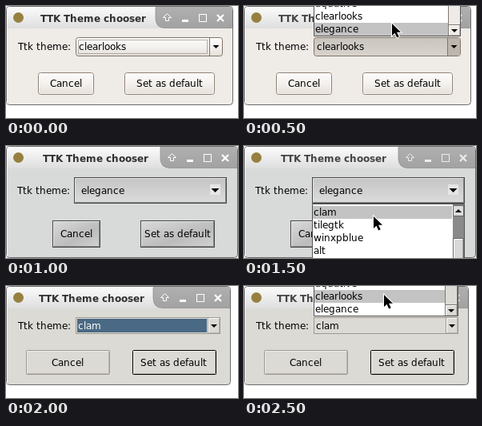
Animation, 290 px wide and 140 px high, one loop 3 s. Source, as an HTML page:

```html
<!DOCTYPE html>
<html lang="en">
<head>
<meta charset="utf-8">
<title>Theme chooser</title>
<style>
html, body { margin: 0; width: 100%; height: 100%; overflow: hidden; background: #fff; }
svg { display: block; width: 290px; height: 140px; }
text { font: 12px "DejaVu Sans", sans-serif; font-kerning: none; white-space: pre; }
.bold { font-weight: bold; }
.scene { visibility: hidden; animation: show 3s step-end infinite; }
@keyframes show {
  0% { visibility: visible; }
  16.6667%, 100% { visibility: hidden; }
}
</style>
</head>
<body>
<svg id="stage" viewBox="0 0 290 140">
  <defs>
    <linearGradient id="bar" x2="0" y2="1"><stop stop-color="#fbfbfb"/><stop offset="1" stop-color="#dedede"/></linearGradient>
    <linearGradient id="wave" x2="0" y2="1"><stop stop-color="#b0b0b0"/><stop offset="1" stop-color="#a2a2a2"/></linearGradient>
    <linearGradient id="cream" x2="0" y2="1"><stop stop-color="#fdfcfb"/><stop offset=".5" stop-color="#f4f1ee"/><stop offset="1" stop-color="#e5dfd9"/></linearGradient>
    <linearGradient id="pressed" x2="0" y2="1"><stop stop-color="#c9c4be"/><stop offset="1" stop-color="#d8d3cd"/></linearGradient>
    <linearGradient id="steel" x2="0" y2="1"><stop stop-color="#c4c4c4"/><stop offset="1" stop-color="#dcdcdc"/></linearGradient>
    <linearGradient id="brushed" y2="1"><stop stop-color="#dadada"/><stop offset=".6" stop-color="#bcbcbc"/><stop offset="1" stop-color="#d2d2d2"/></linearGradient>
  </defs>
</svg>
<script>
const pen = document.createElement('canvas').getContext('2d');

// Glyphs advance by whole pixels, as in the toolkit's text
function advances(x, s, bold) {
  pen.font = `${bold ? 'bold ' : ''}12px "DejaVu Sans", sans-serif`;
  return [...s].map(c => {
    const at = x;
    x += Math.round(pen.measureText(c).width);
    return at;
  }).join(' ');
}

const rect = (x, y, w, h, fill, r = 0) =>
  `<rect x="${x}" y="${y}" width="${w}" height="${h}" rx="${r}" fill="${fill}"/>`;
const frame = (x, y, w, h, line, fill = 'none', r = 0, extra = '') =>
  `<rect x="${x + .5}" y="${y + .5}" width="${w - 1}" height="${h - 1}" rx="${r}" fill="${fill}" stroke="${line}" ${extra}/>`;
const path = (d, fill, line = 'none', width = 1) =>
  `<path d="${d}" fill="${fill}" stroke="${line}" stroke-width="${width}" paint-order="stroke"/>`;
const text = (x, y, s, fill = '#000', cls = '') =>
  `<text x="${advances(x, s, cls === 'bold')}" y="${y}" fill="${fill}" class="${cls}">${s}</text>`;
const down = (x, y, r = 4) => path(`M${x - r} ${y}h${2 * r}l${-r} ${r}z`, '#000');
const up = (x, y, r = 4) => path(`M${x - r} ${y}h${2 * r}l${-r} ${-r}z`, '#000');
const cursor = (x, y) =>
  path(`M${x} ${y}v15l3.5-3.3 2.7 5.8 2.5-1.2-2.7-5.5h5z`, '#000', '#fff', 2);

// Raised or sunken edge inside a box
const bevel = (x, y, w, h, light, dark) =>
  path(`M${x + .5} ${y + h - .5}V${y + .5}H${x + w - .5}`, 'none', light) +
  path(`M${x + .5} ${y + h - .5}H${x + w - .5}V${y + .5}`, 'none', dark);

function titleIcons(w, color) {
  const [a, b, c, d] = [82.5, 60, 38, 16].map(n => w - n);
  return path(`M${a} 9.5l-5 5h3v4h4v-4h3z`, 'none', color) +
    rect(b - 4, 17, 8, 3, color) +
    frame(c - 5, 10, 10, 10, color) +
    path(`M${d - 4} 11l8 8m0-8l-8 8`, 'none', color, 2.2);
}

function shell(w, h, bg, active) {
  const x = w - 97, edge = `M${x} 1V15Q${x} 27.5 ${x + 12} 27.5H${w - 1}`;
  return rect(0, 0, 290, 140, '#fff') +
    frame(0, 0, w, h, '#6c6c6c', bg, 4) +
    path(`M1 28V5Q1 1 5 1H${w - 5}Q${w - 1} 1 ${w - 1} 5V28z`, 'url(#bar)') +
    path(`${edge}V5Q${w - 1} 1 ${w - 5} 1z`, 'url(#wave)') +
    path(edge, 'none', '#929292', .8) +
    path(`M1.5 ${h - 2}V5Q2 1.5 5 1.5H${x}`, 'none', '#fff', .8) +
    '<circle cx="15.5" cy="14.5" r="6.5" fill="#96803f"/>' +
    text(Math.floor(w / 2) - 99, 20, 'TTK Theme chooser', active ? '#303030' : '#444', 'bold') +
    titleIcons(w, active ? '#fff' : '#ececec');
}

// Drop-down list hanging in from the top edge
function upperList(w, barX, pick, bg) {
  return rect(87, 0, w, 38, '#fff') +
    rect(88, pick, barX - 88, 16, '#c3c3c3') +
    text(89, 1, 'aquative') + text(89, 17, 'clearlooks') + text(89, 33, 'elegance') +
    frame(barX, -4, 16, 28, '#7e7972', bg) +
    frame(barX, 23, 16, 15, '#7e7972', bg) +
    bevel(barX + 1, 24, 14, 13, '#fff', '#bbb6ae') +
    down(barX + 8, 29) +
    path(`M87.5 0V37.5H${86.5 + w}V0`, 'none', '#555');
}

function creamButton(x, w, label, textX) {
  return frame(x, 83, w, 28, '#8f8276', 'url(#cream)', 3) +
    frame(x + 1, 84, w - 2, 26, '#fff', 'none', 2, 'stroke-opacity=".65"') +
    text(textX, 101, label);
}

function clearlooks(open) {
  const fill = open ? 'url(#pressed)' : 'url(#cream)';
  return shell(284, 124, '#efebe7', !open) +
    text(15, 55, 'Ttk theme:') +
    frame(87, 39, 184, 24, '#80756a', fill, 3) +
    (open ? rect(255, 40, 15, 22, '#bcb6af') : frame(90, 42, 162, 18, '#6b6660', 'none', 0, 'stroke-dasharray="1 1"')) +
    path('M254.5 40V62', 'none', '#80756a') +
    text(91, 55, 'clearlooks') + down(262.5, 49) +
    creamButton(40, 70, 'Cancel', 55) +
    creamButton(148, 113, 'Set as default', 163) +
    (open ? upperList(184, 255, 21, '#efebe7') + cursor(185, 22) : '');
}

function steelBox(x, y, w, h, fill) {
  return frame(x, y, w, h, '#484848', `url(#${fill})`) +
    bevel(x + 1, y + 1, w - 2, h - 2, '#e6e6e6', '#848484');
}

function elegance(open) {
  let s = shell(290, 140, '#d8dada', !open) +
    text(14, 60, 'Ttk theme:') +
    steelBox(85, 39, 191, 33, 'steel') + text(94, 60, 'elegance') +
    rect(255, 48, 13, 13, '#e6e6e6') + down(261.5, 53, 5) +
    steelBox(58, 93, 60, 34, 'brushed') + text(68, 114, 'Cancel') +
    steelBox(168, 93, 93, 34, 'brushed') + text(173, 114, 'Set as default');
  if (!open) return s;
  s += rect(85, 72, 191, 68, '#fff') + rect(86, 75, 174, 16, '#c3c3c3');
  ['clam', 'tilegtk', 'winxpblue', 'alt'].forEach((name, i) => s += text(87, 87 + 16 * i, name));
  return s + rect(261, 73, 14, 67, '#8a8a8a') +
    frame(261, 74, 14, 14, '#666', '#dcdcdc') + up(268, 83) +
    frame(261, 115, 14, 30, '#666', '#d8d8d8') + bevel(262, 116, 12, 28, '#fff', '#a5a5a5') +
    path('M85.5 140V72.5H275.5V140', 'none', '#555') + cursor(162, 88);
}

function clamButton(x, line, label, textX) {
  return frame(x, 80, 105, 31, line, '#dcdad5', 1) +
    bevel(x + 1, 81, 103, 29, '#eeebe7', '#bab5ab') +
    text(textX, 100, label);
}

function clam(open) {
  return shell(281, 124, '#dcdad5', !open) +
    text(15, 54, 'Ttk theme:') +
    frame(87, 39, 181, 21, '#9e9a91', '#dcdad5') +
    (open ? '' : rect(89, 41, 162, 17, '#4a6984')) +
    text(90, 54, 'clam', open ? '#000' : '#fff') +
    frame(252, 39, 16, 21, '#9e9a91', '#dcdad5') +
    bevel(253, 40, 14, 19, '#fff', '#bab5ab') + down(260, 48) +
    clamButton(25, '#9e9a91', 'Cancel', 57) +
    clamButton(158, '#000', 'Set as default', 168) +
    (open ? upperList(181, 251, 5, '#dcdad5') + cursor(175, 11) : '');
}

const scenes = [clearlooks, elegance, clam].flatMap(draw => [draw(false), draw(true)]);
document.getElementById('stage').insertAdjacentHTML('beforeend', scenes.map((s, i) =>
  `<g class="scene" style="animation-delay:${i * .5 - 3}s">${s}</g>`).join(''));
</script>
</body>
</html>
```
